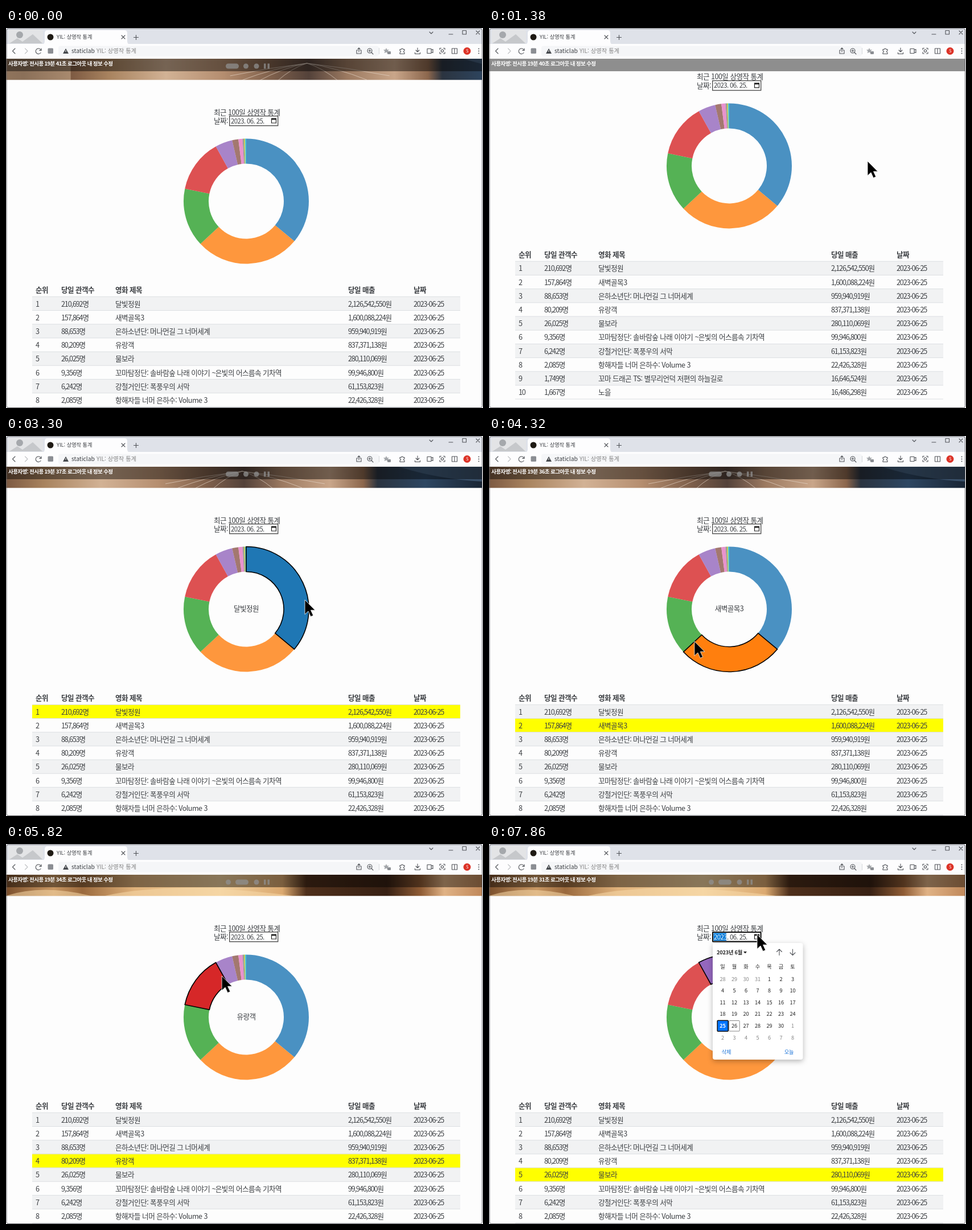
An HTML page for the animation above (8 s loop, 838 px wide and 668 px high).

```html
<!DOCTYPE html>
<html lang="ko">
<head>
<meta charset="utf-8">
<title>상영작 통계</title>
<style>
  html, body { margin: 0; width: 100%; height: 100%; overflow: hidden; background: #fff; }
  svg { display: block; }
  text { font: 12.6px "Noto Sans CJK KR", "Noto Sans KR", "Noto Sans CJK", sans-serif; letter-spacing: -.55px; fill: #3b3e42; }
  .num { letter-spacing: -1.15px; }
  .b { font-weight: 700; }
  .mid { text-anchor: middle; }
  .user { font-size: 9.5px; font-weight: 700; letter-spacing: -.6px; fill: #fff; }
  .tab { font-size: 9.2px; letter-spacing: 0; }
  .addr { font-size: 10.3px; letter-spacing: 0; }
  .date { font-size: 11.4px; letter-spacing: -.6px; }
  .cal { font-size: 9.2px; letter-spacing: -.2px; fill: #222; }
  .dim { fill: #858585; }
  .link { fill: #1a73d8; }
  .ico { fill: none; stroke: #505358; stroke-width: 1.1; stroke-linecap: round; stroke-linejoin: round; }
  .anim { animation: 8s linear infinite; }
  .popup { filter: drop-shadow(0 3px 5px rgba(0,0,0,.28)); }
</style>
</head>
<body>
<svg id="stage" width="838" height="668" xmlns="http://www.w3.org/2000/svg"></svg>
<script>
const LOOP = 8000;
let css = '';

// Keyframes from [ms, declarations] pairs; returns the attributes that play them.
function play(name, keys, easing = 'linear') {
  css += `@keyframes ${name}{` + keys.map(([ms, d]) => `${ms / LOOP * 100}%{${d}}`).join('') + '}';
  return `class="anim" style="animation-name:${name};animation-timing-function:${easing}"`;
}
const during = (from, to) => play(`on${from}to${to}`, [
  [0, 'visibility:hidden'], [from, 'visibility:visible'], [to, 'visibility:hidden']], 'step-end');
const move = (x, y, ease = 'linear') => `transform:translate(${x}px,${y}px);animation-timing-function:${ease}`;

const text = (x, y, s, cls = '') => `<text x="${x}" y="${y}" class="${cls}">${s}</text>`;
const rect = (x, y, w, h, fill, more = '') => `<rect x="${x}" y="${y}" width="${w}" height="${h}" fill="${fill}" ${more}/>`;
const dot = (x, y, r, fill) => `<circle cx="${x}" cy="${y}" r="${r}" fill="${fill}"/>`;
const path = (d, more = 'class="ico"') => `<path d="${d}" ${more}/>`;
const group = (attrs, body) => `<g ${attrs}>${body}</g>`;
const grad = (id, stops) => `<linearGradient id="${id}">` + stops.map(([o, c]) =>
  `<stop offset="${o}" stop-color="${c}"/>`).join('') + '</linearGradient>';

const films = [
  ['달빛정원', 210692, '2,126,542,550'],
  ['새벽골목3', 157864, '1,600,088,224'],
  ['은하소년단: 머나먼길 그 너머세계', 88653, '959,940,919'],
  ['유랑객', 80209, '837,371,138'],
  ['물보라', 26025, '280,110,069'],
  ['꼬마탐정단: 솔바람숲 나래 이야기 ~은빛의 어스름속 기차역', 9356, '99,946,800'],
  ['강철거인단: 폭풍우의 서막', 6242, '61,153,823'],
  ['항해자들 너머 은하수: Volume 3', 2085, '22,426,328'],
  ['꼬마 드래곤 TS: 별무리언덕 저편의 하늘길로', 1749, '16,646,524'],
  ['노을', 1667, '16,486,298']
];
const colors = ['#1f77b4', '#ff7f0e', '#2ca02c', '#d62728', '#9467bd',
  '#8c564b', '#e377c2', '#7f7f7f', '#bcbd22', '#17becf'];
const hoverAt = [3000, 3960, 4740, 5580, 6000, LOOP];
const hovers = hoverAt.slice(0, -1).map((t, i) => during(t, hoverAt[i + 1]));
const SLIDE = 4900;

function hero() {
  const strip = play('slide', [
    [0, move(115, 0, 'cubic-bezier(.2,.6,.4,1)')], [260, move(0, 0)],
    [SLIDE, move(0, 0, 'ease')], [SLIDE + 600, move(-836, 0)], [LOOP, move(-836, 0)]]);
  const whiskers = [[300, 92], [330, 93], [362, 94], [470, 93], [520, 91], [560, 84], [280, 84]]
    .map(([x, y]) => `M415 62Q${(x + 415) / 2} 70 ${x} ${y}`).join('');
  const slides = ['fur', 'cat', 'warm'].map((id, i) => rect((i - 1) * 836, 54, 837, 37.5, `url(#${id})`)).join('')
    + path(whiskers, 'fill="none" stroke="#e6d8ca" stroke-width="1" opacity=".65"')
    + path('M836 91Q900 70 985 91ZM1010 91Q1130 64 1340 91Z', 'fill="#f8d9a8" opacity=".55"')
    + path('M690 54L836 54V80Q760 76 690 54Z', 'fill="#58789a" opacity=".5"');
  const marks = active => [0, 1, 2].map(i => {
    const w = i === active ? 23 : 9, x = [386, active ? 403 : 417, 435.5][i];
    return rect(x, 62.5, w, 9, '#fff', 'rx="4.5"');
  }).join('');
  return group(strip, slides) + group('opacity=".75"',
    group(during(0, SLIDE), marks(0)) + group(during(SLIDE, LOOP), marks(1))
    + rect(453, 62.5, 3.5, 9, '#fff') + rect(459.5, 62.5, 3.5, 9, '#fff'));
}

function donut() {
  const total = films.reduce((s, f) => s + f[1], 0), turn = 2 * Math.PI / total;
  const at = (r, a) => `${(422 + r * Math.sin(a)).toFixed(2)} ${(304.5 - r * Math.cos(a)).toFixed(2)}`;
  let a = 0, base = '', hot = '';
  films.forEach(([name, n], i) => {
    const b = a + n * turn, big = b - a > Math.PI ? 1 : 0;
    const d = `M${at(110, a)}A110 110 0 ${big} 1 ${at(110, b)}L${at(66, b)}A66 66 0 ${big} 0 ${at(66, a)}Z`;
    base += path(d, `fill="${colors[i]}" opacity=".8"`);
    if (hovers[i]) hot += group(hovers[i],
      path(d, `fill="${colors[i]}" stroke="#000" stroke-width="1.6"`) + text(422, 307.5, name, 'mid'));
    a = b;
  });
  return base + hot;
}

function table() {
  const cols = [52, 97, 192, 601, 716], top = 472.3, step = 24.2;
  let back = '', cells = '';
  ['순위', '당일 관객수', '영화 제목', '당일 매출', '날짜'].forEach((h, i) => cells += text(cols[i], 465, h, 'b'));
  films.forEach(([name, n, won], i) => {
    const y = top + i * step, base = y + 17.2;
    if (i % 2 === 0) back += rect(46, y, 752, step, '#f1f2f3');
    if (hovers[i]) back += group(hovers[i], rect(46, y, 752, step, '#ff0'));
    back += rect(46, y - .5, 752, 1, '#dcdfe2');
    [i + 1, n.toLocaleString('en-US') + '명', name, won + '원', '2023-06-25'].forEach((s, c) =>
      cells += text(cols[c], base, s, c === 2 ? '' : 'num'));
  });
  return back + rect(46, top + 10 * step - .5, 752, 1, '#dcdfe2') + cells;
}

function dateField() {
  const icon = path('M466.5 159.5h8v7.5h-8z', 'fill="none" stroke="#222" stroke-width="1.2"')
    + rect(466, 158.5, 9, 2.8, '#222');
  return text(365, 152.5, '최근 100일 상영작 통계') + text(365, 168, '날짜:')
    + rect(392.7, 154.7, 85, 17, '#fff', 'stroke="#505050" stroke-width="1.4"')
    + text(395, 167.5, '2023. 06. 25.', 'date') + icon
    + group(during(7080, LOOP),
      rect(393, 155, 84.5, 16.5, 'none', 'stroke="#101010" stroke-width="2" rx="1.5"')
      + rect(394.5, 156.5, 22.5, 13.5, '#0078d7')
      + '<text x="395" y="167.5" class="date" style="fill:#fff">2023</text>');
}

function calendar() {
  const x = i => 410.5 + 20.5 * i;
  let s = rect(393, 174, 158.5, 205, '#fff', 'rx="4" class="popup"')
    + text(400, 193.5, '2023년 6월', 'cal b')
    + path('M447 189h6l-3 3.4z', 'fill="#222"')
    + path('M510 195.5v-10.5m-4.5 4.5l4.5-4.5l4.5 4.5M533.5 185v10.5m-4.5-4.5l4.5 4.5l4.5-4.5');
  [...'일월화수목금토'].forEach((d, i) => s += text(x(i), 218.5, d, 'cal mid'));
  s += rect(401.2, 310.2, 19, 19, '#0075ff', 'stroke="#101010" stroke-width="1.5" rx="1"')
    + rect(421.7, 310.5, 18.5, 18.5, 'none', 'stroke="#888" rx="1"');
  for (let k = 0; k < 42; k++) {
    const n = k - 3, day = n < 1 ? n + 31 : n > 30 ? n - 30 : n, y = 240.5 + 20.65 * Math.floor(k / 7);
    const cls = n < 1 || n > 30 ? 'cal mid dim' : 'cal mid';
    s += n === 25 ? `<text x="${x(0)}" y="${y}" class="cal mid b" style="fill:#fff">25</text>` : text(x(k % 7), y, day, cls);
  }
  return group(during(7140, LOOP), s + text(417, 368.5, '삭제', 'cal mid link') + text(527, 368.5, '오늘', 'cal mid link'));
}

function userBar() {
  const ticks = [0, 720, 1500, 2460, 3300, 4020, 4740, 5580, 6300, 7080, 7860, LOOP];
  return rect(0, 54, 837, 22, '#000', 'opacity=".44"') + ticks.slice(0, -1).map((t, i) =>
    group(during(t, ticks[i + 1]), text(4, 65.7, `사용자명: 전시용 19분 ${41 - i}초 로그아웃 내 정보 수정`, 'user'))).join('');
}

function browser() {
  const title = 'YIL: 상영작 통계';
  return rect(0, 0, 838, 30, '#dfe2e9') + rect(0, 28, 838, 26, '#fdfdfe')
    + rect(5, 3, 60, 24, '#e3e4e6', 'rx="4"')
    + path('M6 27L20 18L29 24L47 11L64 27Z', 'fill="#c6c8cb"') + dot(24, 12, 6, '#a5a8ac')
    + path('M64 29Q68 28 68 23V9Q68 4 73 4H208Q213 4 213 9V23Q213 28 217 29Z', 'fill="#fdfdfe"')
    + dot(78, 16, 5.5, '#1e1a14') + text(89, 19.3, title, 'tab')
    + path('M203 13l6 6m0-6l-6 6M224.5 16.5h8m-4-4v8')
    + path('M744 7l3 3l3-3M778 11h7M802 4.500h6.500v6.500h-6.500zM826 5l6 6m0-6l-6 6')
    + path('M16 36l-4.500 4.500l4.500 4.500') + path('M33.500 36l4.500 4.500l-4.500 4.500', 'class="ico" opacity=".35"')
    + path('M61.500 39A4.800 4.800 0 1 0 61 43.500M62 36v3.500h-3.500')
    + rect(73.5, 35.5, 9.5, 9.5, '#8b8e93', 'rx="1.5"')
    + rect(92, 31.5, 563, 18, '#f5f6f8', 'rx="4"')
    + path('M105 36l5 9h-10z', 'fill="#44474b"') + rect(104.5, 39, 1, 3, '#fff')
    + text(115, 44, 'staticlab', 'addr') + text(159, 44, title, 'addr dim')
    // toolbar icons
    + path('M618 39h-2v6h8v-6h-2M620 42v-7m-2 2l2-2l2 2')
    + path('M642 43l3 3M637 40h4m-2-2v4') + `<circle cx="639" cy="40" r="4" class="ico"/>`
    + rect(655, 35, 1, 11, '#d5d7da')
    + path('M668 35l1.500 3.200h3.500l-2.500 2.500l.8 3.600l-3.300-1.800l-3.300 1.800l.8-3.600l-2.500-2.500h3.500z', 'fill="#a3a6aa"')
    + rect(670, 41, 6, 5, '#8b8e93', 'rx="1"')
    + path('M692 37.500h2.500a1.500 1.500 0 0 1 3 0h2.500v2.500a1.500 1.500 0 0 0 0 3v2.500h-8v-2.500a1.500 1.500 0 0 0 0-3z')
    + path('M723 35v7m-3-3l3 3l3-3M718.500 43v2.500h9v-2.500')
    + path('M740 36.500h7v8h-7zM747 39l3-1.500v6l-3-1.500')
    + path('M762 38v-2.500h2.500M768.500 35.500h2.500v2.500M771 42.500v2.500h-2.500M764.500 45h-2.500v-2.500')
    + `<circle cx="766.5" cy="40.200" r="2.200" class="ico"/>`
    + path('M783.500 36h9v9h-9zM788 36v9')
    + dot(810, 40.5, 6.5, '#dc3328') + '<text x="810" y="43" class="mid" style="fill:#fff;font-size:7px">S</text>'
    + [36.5, 40.5, 44.5].map(y => dot(830.5, y, 1, '#505358')).join('');
}

function pointer() {
  const keys = [[0, 850, 145], [400, 842, 145], [720, 724, 154], [840, 724, 154], [1020, 665, 234],
    [2700, 665, 234], [2820, 637, 268], [2940, 572, 290], [3060, 525, 288], [3480, 525, 288],
    [3720, 462, 371], [3900, 462, 371], [4140, 400, 388], [4380, 348, 352], [4700, 348, 352],
    [4860, 333, 312], [5040, 351, 262], [5540, 351, 262], [5820, 379, 232], [6000, 393, 221],
    [6390, 393, 221], [6660, 425, 192], [6900, 471, 159], [LOOP, 471, 159]];
  return group(play('pointer', keys.map(([t, x, y]) => [t, move(x, y)])),
    path('M0 0V25.500L6 20L10.300 29.500L14.800 27.500L10.500 18.200H18Z', 'fill="#000" stroke="#fff" stroke-width=".8"'));
}

const scroll = play('scroll', [
  [0, move(0, 0)], [1200, move(0, 0, 'ease-in-out')], [1500, move(0, -92.2)],
  [2500, move(0, -92.2, 'ease-in-out')], [2760, move(0, 0)], [LOOP, move(0, 0)]]);

const page = hero() + rect(0, 91.5, 838, 700, '#fdfdfd') + dateField() + donut() + table()
  + rect(2, 729, 834, 1, '#e4e4e4') + rect(8, 738, 829, 60, '#332c2c') + dot(421.5, 760, 12, '#1a1717');

document.getElementById('stage').innerHTML = '<defs>'
  + grad('fur', [[0, '#6b5340'], [.5, '#b99a7c'], [.9, '#8b7059'], [1, '#a98a6e']])
  + grad('cat', [[0, '#7d5a42'], [.08, '#a8835f'], [.2, '#d2b295'], [.32, '#b58e70'], [.42, '#80614c'],
    [.5, '#54423a'], [.58, '#9c7a61'], [.68, '#c9a68a'], [.75, '#8c674d'], [.78, '#2b3440'], [.88, '#2e4763'], [1, '#192534']])
  + grad('warm', [[0, '#7b4f2c'], [.1, '#c99864'], [.16, '#9a693d'], [.27, '#e0b27b'], [.45, '#f3d3a0'],
    [.58, '#dba970'], [.63, '#4e2f1b'], [.8, '#382114'], [.87, '#8f5c35'], [.92, '#e0b285'], [1, '#c0885a']])
  + '</defs>' + rect(0, 0, 838, 668, '#fdfdfd') + group(scroll, page) + userBar() + browser() + calendar() + pointer()
  + rect(1, 1, 835.5, 666.5, 'none', 'rx="3" stroke="#626267"') + rect(837, 0, 1, 668, '#f4f4f4');

const sheet = document.createElement('style');
sheet.textContent = css;
document.head.append(sheet);
</script>
</body>
</html>
```
